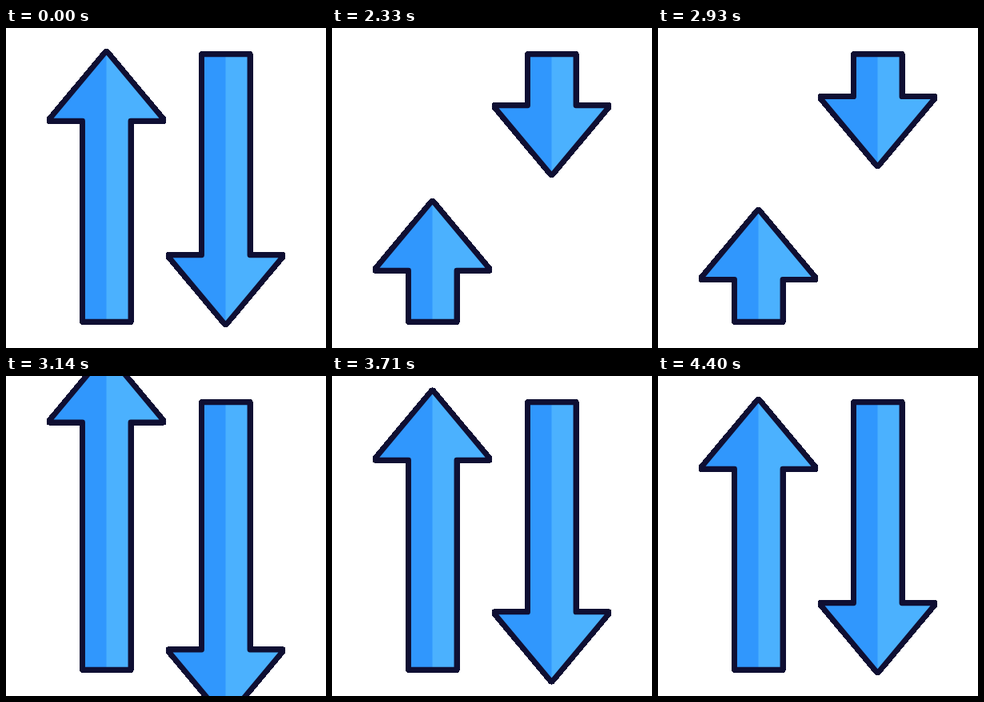
Recreate the animation shown at these times as an HTML page. Size 400 px wide and 400 px high, loop 4430 ms.

```html
<!DOCTYPE html>
<html lang="en">
<head>
<meta charset="utf-8">
<title>Arrows</title>
<style>
  html, body { margin: 0; width: 100%; height: 100%; overflow: hidden; background: #fff; }
  svg { display: block; width: 100vw; height: 100vh; }
  .line { fill: none; stroke: #0f0f33; stroke-linejoin: round; }
</style>
</head>
<body>
<svg viewBox="0 0 400 400">
  <defs>
    <g id="arrow">
      <path class="line full" stroke-width="7.4" shape-rendering="crispEdges"/>
      <path class="full" fill="#4bb1fe"/>
      <path class="half" fill="#3097fd"/>
      <path class="line full" stroke-width="6.7"/>
    </g>
  </defs>
  <use href="#arrow"/>
  <use href="#arrow" transform="translate(149 400) scale(1 -1)"/>
</svg>
<script>
  const LOOP = 4430, START = 2000, STEP = 30;
  // [step, head offset]: squeeze, hold, spring out, settle
  const keys = [[0, 0], [15, 226.7], [29, 226.7], [39.5, -75], [50, 35], [59.7, -22], [70, 10], [80, 0]];

  const ease = x => x * x * (3 - 2 * x);

  function headOffset(time) {
    const step = Math.max(0, Math.floor((time - START) / STEP));
    const next = keys.findIndex(([at]) => at > step);
    if (next < 0) return 0;
    const [[t0, y0], [t1, y1]] = [keys[next - 1], keys[next]];
    return y0 + (y1 - y0) * ease((step - t0) / (t1 - t0));
  }

  function setPath(selector, d) {
    document.querySelectorAll(selector).forEach(path => path.setAttribute('d', d));
  }

  function draw(offset) {
    const tip = 29.4 + offset, base = 116.2 + offset;
    const left = `M125.5 ${tip}H124.9L54.3 ${base - 2.4}V${base}H95.6V367.2H125.5`;
    setPath('.half', left + 'Z');
    setPath('.full', `${left}H155.9V${base}H196.7V${base - 2.4}L126.1 ${tip}Z`);
  }

  function frame() {
    draw(headOffset(performance.now() % LOOP));
    requestAnimationFrame(frame);
  }
  frame();
</script>
</body>
</html>
```
